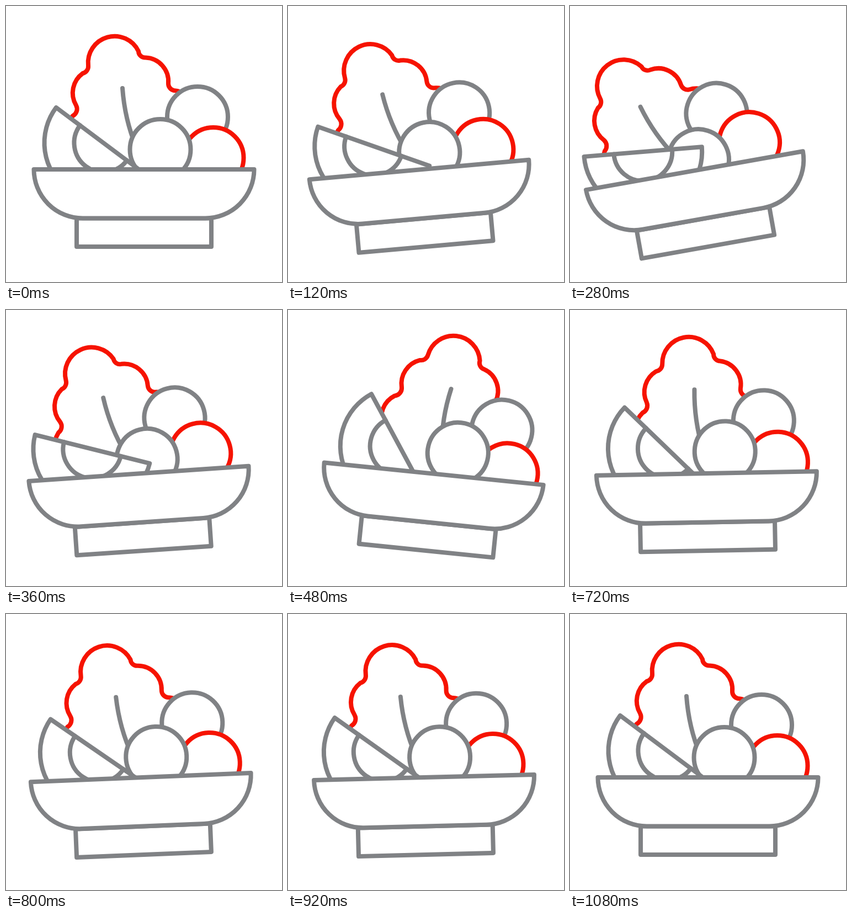
An HTML page for the animation above (2000 ms loop, 500 by 500 pixels).

```html
<!DOCTYPE html>
<html lang="en">
<head>
<meta charset="utf-8">
<title>Rocking salad bowl</title>
<style>
  html, body { margin: 0; width: 100%; height: 100%; overflow: hidden; background: #fff; }
  svg { display: block; width: 100%; height: 100%; }
  g { fill: #fff; stroke: #808285; stroke-width: 8; stroke-linejoin: round; stroke-linecap: round; }
  .red { stroke: #f61300; }
  .open { fill: none; }
</style>
</head>
<body>
<svg viewBox="0 0 500 500">
  <g id="all">
    <g id="leaf">
      <path class="red open" d="M122 258 A44 44 0 0 1 121 199 A14 14 0 0 0 127 180 A44 44 0 0 1 139 122
        A13 13 0 0 0 149 108 A48 48 0 0 1 240 82 A12 12 0 0 0 253 93.5 A43 43 0 0 1 294 140
        A13 13 0 0 0 304 153 A44 44 0 0 1 328 162"/>
      <path class="open" d="M211 149 Q215 205 236 256"/>
    </g>
    <g id="balls">
      <circle cx="347" cy="201" r="55"/>
      <circle class="red" cx="375.5" cy="275" r="55"/>
      <circle cx="279.5" cy="260" r="55"/>
    </g>
    <g id="wedge">
      <g transform="translate(176.5 248) rotate(36.8)">
        <path d="M-107 0 A107 107 0 0 0 107 0 Z"/>
        <path class="open" d="M-53 0 A53 53 0 0 0 53 0"/>
      </g>
    </g>
    <path d="M128 384.5 H372 V436 H128 Z"/>
    <path d="M50.5 296 H449.5 A88.5 88.5 0 0 1 361 384.5 H139 A88.5 88.5 0 0 1 50.5 296 Z"/>
  </g>
</svg>
<script>
  const LOOP = 2000, STEP = 40;

  // Each part swings about its pivot; keys are [ms, degrees].
  const swings = [
    { id: 'all',   pivot: '250 436', keys: [[0, 0], [240, -10.2], [270, -10.2], [480, 5.8], [800, -2.35], [1080, 0]] },
    { id: 'leaf',  pivot: '270 335', keys: [[0, 0], [280, -11.9], [560, 23.3], [800, 0]] },
    { id: 'balls', pivot: '328 330', keys: [[0, 0], [280, -17.4], [560, 14.2], [800, 0]] },
    { id: 'wedge', pivot: '167 269', keys: [[0, 0], [280, -31.4], [560, 31.6], [800, 0]] }
  ];
  for (const s of swings) s.node = document.getElementById(s.id);

  const ease = x => x * x * (3 - 2 * x);

  function angleAt(keys, t) {
    const i = keys.findIndex(k => k[0] > t);
    if (i < 0) return keys[keys.length - 1][1];
    const [t0, a] = keys[i - 1], [t1, b] = keys[i];
    return a + (b - a) * ease((t - t0) / (t1 - t0));
  }

  function draw(now) {
    const t = Math.floor((now % LOOP) / STEP) * STEP;
    for (const s of swings)
      s.node.setAttribute('transform', `rotate(${angleAt(s.keys, t)} ${s.pivot})`);
  }

  const start = performance.now();
  function tick() {
    draw(performance.now() - start);
    requestAnimationFrame(tick);
  }
  tick();
</script>
</body>
</html>
```
